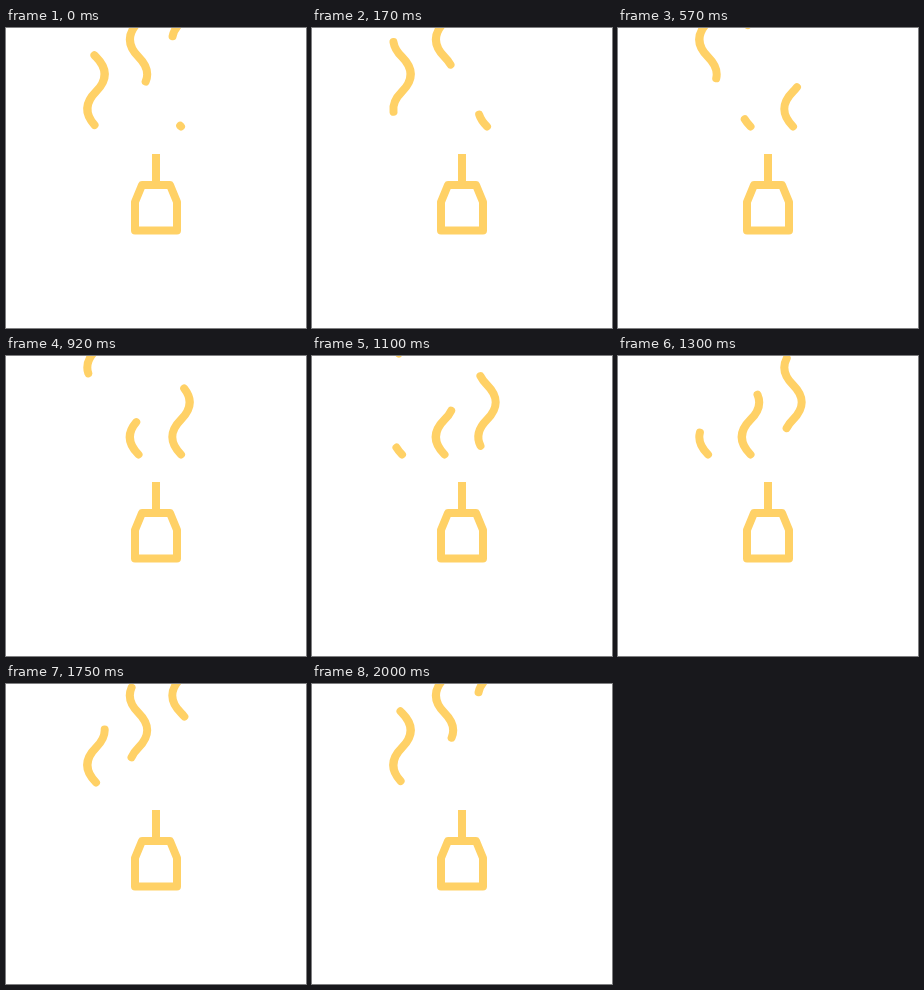
These frames come from a looping animation (300x300 px, 2.02 s). An HTML page:

```html
<!DOCTYPE html>
<html>
<head>
<meta charset="utf-8">
<style>
html, body { margin: 0; width: 100%; height: 100%; overflow: hidden; background: #fff; }
svg { display: block; width: 100%; height: 100%; }
</style>
</head>
<body>
<svg viewBox="0 0 300 300" fill="none" stroke="#ffd166" stroke-width="8" stroke-linejoin="round">
  <path d="M150 126V157"/>
  <path d="M136 157H164L171 174V202.5H129V174Z"/>
  <g id="steam" stroke-linecap="round"></g>
</svg>
<script>
const LOOP = 2020, CYCLE = 2000, DASH = 79.9;
const steam = document.getElementById('steam');
const wisps = [];

// Two strands per wisp: the old one leaves while the new one rises.
for (const [x, delay] of [[175, 0], [132.5, 465], [90, 1000]]) {
  for (const lead of [0, CYCLE]) {
    const path = document.createElementNS('http://www.w3.org/2000/svg', 'path');
    path.setAttribute('d', `M${x} 98.5c-11.6-11.6-11.6-23.2 0-34.8` +
      's11.6-23.2 0-34.8-11.6-23.2 0-34.8 11.6-23.2 0-34.8');
    steam.append(path);
    wisps.push({ path, delay, lead });
  }
}

// Distance travelled by the tip: steady at first, then speeding up.
const travel = age => 1 + 0.0775 * age + 3.35e-9 * age ** 3;

function draw() {
  const time = Math.min(performance.now() % LOOP, CYCLE);
  for (const { path, delay, lead } of wisps) {
    const age = (time - delay + CYCLE) % CYCLE + lead;
    const head = travel(age);
    const tail = Math.max(0, head - DASH);
    path.style.display = age > 0 && tail < 130 ? '' : 'none';
    path.setAttribute('stroke-dasharray', `${head - tail} 999`);
    path.setAttribute('stroke-dashoffset', -tail);
  }
  requestAnimationFrame(draw);
}
draw();
</script>
</body>
</html>
```
